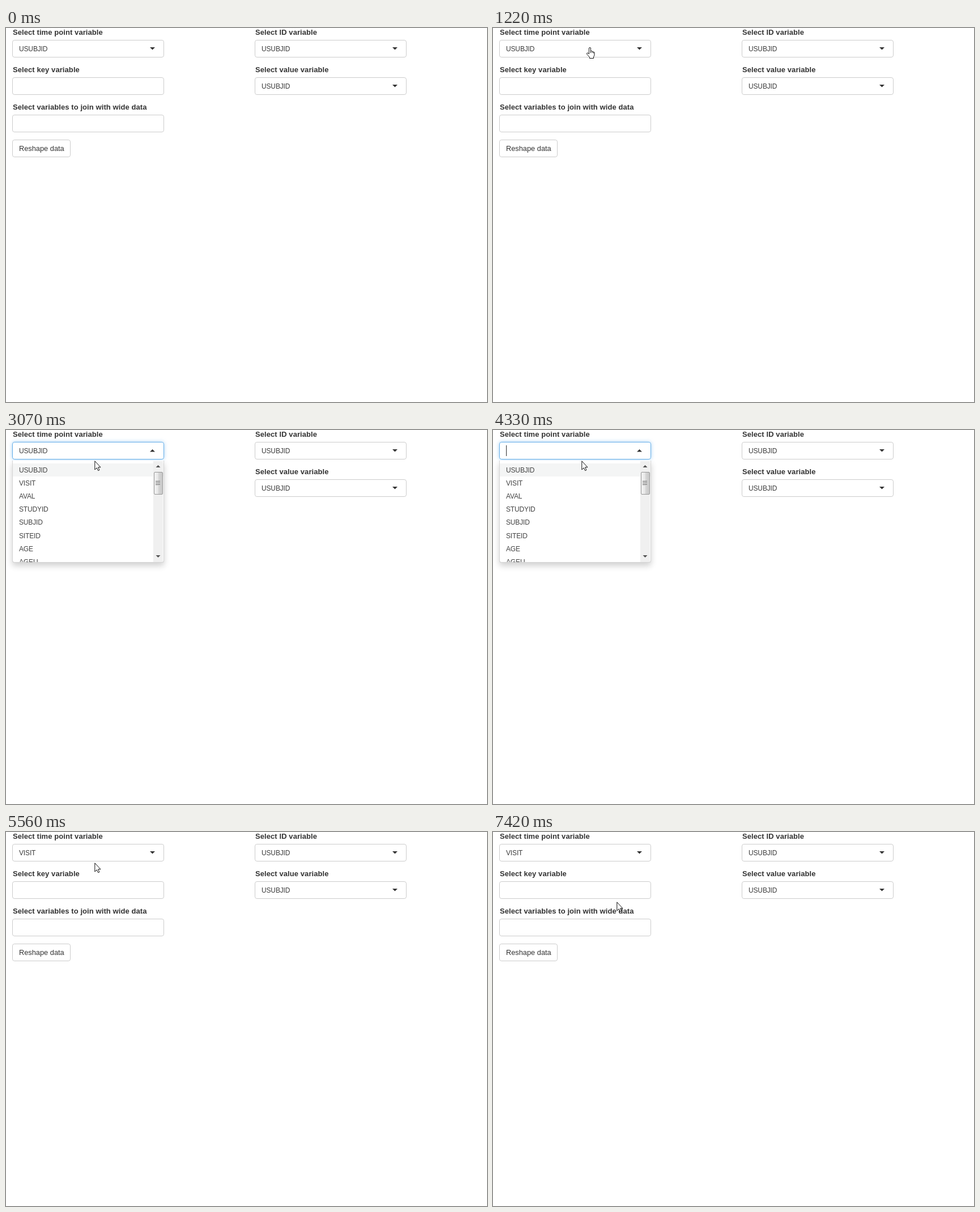
An HTML page with a canvas that plays this animation: 849 by 660 pixels, repeating every 8000 ms.

```html
<!DOCTYPE html>
<html lang="en">
<head>
<meta charset="utf-8">
<title>Reshape data form</title>
<style>
html, body { margin: 0; width: 100%; height: 100%; overflow: hidden; background: #fff; }
canvas { display: block; }
</style>
</head>
<body>
<canvas id="stage" width="849" height="660"></canvas>
<script>
const ctx = document.getElementById('stage').getContext('2d');
const LOOP = 8000;
const FONT = '"Liberation Sans", Arial, sans-serif';
const OPTIONS = ['USUBJID', 'VISIT', 'AVAL', 'STUDYID', 'SUBJID', 'SITEID', 'AGE', 'AGEU'];
const MATCHES = ['VISIT', 'VISITN'];

// Each step overrides the state from its start time on.
const STEPS = [
  { at: 0, value: 'USUBJID', open: null, caret: 0, cursor: null },
  { at: 590, cursor: ['hand', 186, 49] },
  { at: 1220, cursor: ['hand', 165, 34] },
  { at: 1830, open: 'all', caret: 72.5, cursor: ['beam', 167, 28] },
  { at: 2460, cursor: ['arrow', 156, 54] },
  { at: 3070, caret: 0 },
  { at: 3730, caret: 72.5 },
  { at: 4330, value: '', caret: 23.2 },
  { at: 4950, value: 'vi', open: 'matches', caret: 32 },
  { at: 5560, value: 'VISIT', open: null, caret: 0 },
  { at: 6810, cursor: ['hand', 493, 28] },
  { at: 7420, cursor: ['arrow', 218, 123] }
];

function stateAt(t) {
  return Object.assign({}, ...STEPS.filter(s => s.at <= t));
}

function text(str, x, y, size = 12, color = '#444', weight = '', spacing = -0.15) {
  ctx.font = `${weight} ${size}px ${FONT}`;
  ctx.letterSpacing = spacing + 'px';
  ctx.fillStyle = color;
  ctx.fillText(str, x, y);
}

function label(str, x, y) {
  text(str, x, y, 13, '#333', 'bold', 0.08);
}

function rect(x, y, w, h, color) {
  ctx.fillStyle = color;
  ctx.fillRect(x, y, w, h);
}

function triangle(cx, y, half, height, up, color = '#333') {
  const base = up ? y + height : y, tip = up ? y : y + height;
  ctx.fillStyle = color;
  ctx.beginPath();
  ctx.moveTo(cx - half, base);
  ctx.lineTo(cx + half, base);
  ctx.lineTo(cx, tip);
  ctx.fill();
}

function box(x, y, w, h, focus) {
  ctx.beginPath();
  ctx.roundRect(x + 0.5, y + 0.5, w - 1, h - 1, 3.4);
  ctx.fillStyle = '#fff';
  if (focus) {
    ctx.save();
    ctx.shadowColor = 'rgba(102,175,233,.65)';
    ctx.shadowBlur = 7;
    ctx.fill();
    ctx.restore();
  }
  ctx.fill();
  ctx.lineWidth = 1;
  ctx.strokeStyle = focus ? '#66afe9' : '#ccc';
  ctx.stroke();
}

function select(x, y, value, open) {
  box(x, y, 268, 31, open);
  text(value, x + 12, y + 20, 12, '#3c3c3c');
  triangle(x + 247.5, y + 13, 4.5, 4.5, open);
}

function scrollbar() {
  rect(260, 55, 17, 178, '#f0f0f0');
  triangle(268.5, 62, 4, 4, true, '#505050');
  triangle(268.5, 221, 4, 4, false, '#505050');
  const shade = ctx.createLinearGradient(261, 0, 277, 0);
  shade.addColorStop(0, '#f4f4f4');
  shade.addColorStop(0.45, '#e8e8e8');
  shade.addColorStop(0.5, '#d8d8d8');
  shade.addColorStop(1, '#c4c4c4');
  ctx.beginPath();
  ctx.roundRect(261.5, 74.5, 15, 39, 1.5);
  ctx.fillStyle = shade;
  ctx.fill();
  ctx.strokeStyle = '#979797';
  ctx.stroke();
  for (let y = 90; y < 99; y += 3) {
    rect(264, y, 8, 1, '#555');
    rect(264, y + 1, 8, 1, '#f4f4f4');
  }
}

function dropdown(kind) {
  const all = kind === 'all';
  const height = all ? 180 : 56;
  ctx.save();
  ctx.beginPath();
  ctx.rect(0, 54, 300, 220);
  ctx.clip();
  ctx.shadowColor = 'rgba(0,0,0,.19)';
  ctx.shadowBlur = 10.8;
  ctx.shadowOffsetY = 5.4;
  ctx.beginPath();
  ctx.roundRect(11, 54, 268, height, [0, 0, 3.6, 3.6]);
  ctx.fillStyle = '#d5d5d5';
  ctx.fill();
  ctx.restore();

  ctx.save();
  ctx.beginPath();
  ctx.roundRect(12, 54, 266, height - 1, [0, 0, 3, 3]);
  ctx.clip();
  rect(12, 54, 266, height, '#fff');
  rect(12, 59, 266, 23, '#f4f5f5');
  (all ? OPTIONS : MATCHES).forEach((name, i) => {
    const y = Math.round(74.8 + 23.17 * i);
    if (!all) rect(23, y - 11, 11, 13, i ? '#fff3b5' : '#f8edb4');
    text(name, 23, y);
  });
  if (all) scrollbar();
  ctx.restore();
}

const HAND = new Path2D('M4.5 12V2Q4.5.5 6 .5Q7.5.5 7.5 2V6.5Q9.8 6 10.2 7.4Q12.3 7 12.5 8.4Q14 8.2 14 10V13Q13.8 15.5 12.5 17V19.5H5.5V17.5L1 12.5Q0 10.6 1.3 9.9Q3 9.6 4.5 12Z');
const KNUCKLES = new Path2D('M7.5 6.5V10M10.2 7.4V10M12.5 8.4V10.5');
const ARROW = new Path2D('M.8.8V16L4.2 12.8L6.7 17.7L8.9 16.7L6.6 11.8H11Z');

function outline(path) {
  ctx.fillStyle = '#fff';
  ctx.fill(path);
  ctx.strokeStyle = '#111';
  ctx.lineWidth = 1;
  ctx.stroke(path);
}

const CURSORS = {
  hand() {
    outline(HAND);
    ctx.stroke(KNUCKLES);
  },
  arrow() {
    outline(ARROW);
  },
  beam() {
    for (const y of [0, 14]) {
      rect(0, y, 3, 1, '#222');
      rect(4, y, 3, 1, '#222');
    }
    rect(3, 1, 1, 13, '#222');
  }
};

function draw(t) {
  const s = stateAt(t);
  rect(0, 0, 849, 660, '#fff');

  label('Select time point variable', 12, 12);
  label('Select key variable', 12, 78);
  label('Select variables to join with wide data', 12, 144);
  label('Select ID variable', 440, 12);
  label('Select value variable', 440, 78);

  box(11, 87, 268, 31);
  box(11, 153, 268, 31);
  box(11, 197, 103, 31);
  text('Reshape data', 23, 217, 12.8, '#333', '', 0);
  select(439, 21, 'USUBJID', false);
  select(439, 87, 'USUBJID', false);
  select(11, 21, s.value, !!s.open);

  if (s.open) dropdown(s.open);
  if (s.caret) rect(s.caret, 27, 1, 19, '#222');
  if (s.cursor) {
    const [kind, x, y] = s.cursor;
    ctx.save();
    ctx.translate(x, y);
    CURSORS[kind]();
    ctx.restore();
  }
}

const start = performance.now();
function tick() {
  draw((performance.now() - start) % LOOP);
  requestAnimationFrame(tick);
}
tick();
</script>
</body>
</html>
```
